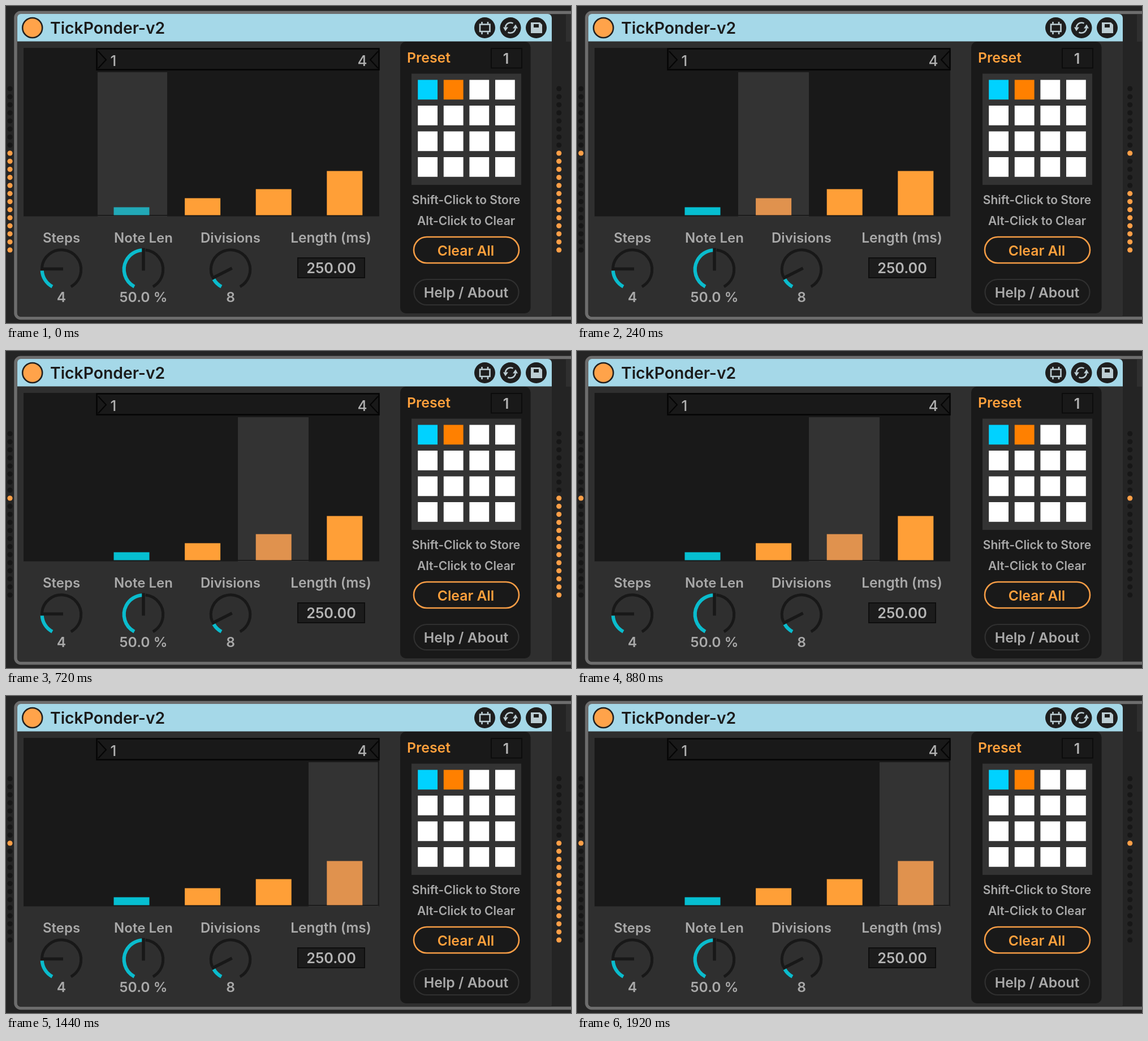
Animation, 999 px wide and 560 px high, one loop 2 s. Source, as an HTML page with a canvas:

```html
<!DOCTYPE html>
<html>
<head>
<meta charset="utf-8">
<style>
html, body { margin: 0; width: 999px; height: 560px; overflow: hidden; background: #242424; }
canvas { display: block; }
</style>
</head>
<body>
<canvas id="stage" width="999" height="560"></canvas>
<script>
const c = document.getElementById('stage').getContext('2d');
const LOOP = 2000, TICK = 80;
const STARTS = [0, 180, 680, 1430];
const CELLS = [162, 285, 410, 535, 659];
const DARK = '#191919', BODY = '#2f2f2f', GREY = '#a9a9a9', ORANGE = '#ffa03c', CYAN = '#0abccd', BLUE = '#a5d8e8';
const rad = deg => deg * Math.PI / 180;

function paint(fill, stroke, width = 2) {
  if (fill) { c.fillStyle = fill; c.fill(); }
  if (stroke) { c.strokeStyle = stroke; c.lineWidth = width; c.stroke(); }
}
function box(x, y, w, h, fill, stroke, width, radius = 0) {
  c.beginPath();
  c.roundRect(x, y, w, h, radius);
  paint(fill, stroke, width);
}
function disc(x, y, r, fill, stroke, width) {
  c.beginPath();
  c.arc(x, y, r, 0, 7);
  paint(fill, stroke, width);
}
function arc(x, y, r, from, to, color, width) {
  c.beginPath();
  c.arc(x, y, r, rad(from), rad(to));
  paint(null, color, width);
}
function path(points, stroke, width, fill) {
  c.beginPath();
  points.forEach(([x, y]) => c.lineTo(x, y));
  paint(fill, stroke, width);
}
function text(str, x, y, size, color = GREY, align = 'center', weight = 600) {
  c.font = `${weight} ${size}px Inter, sans-serif`;
  c.textAlign = align;
  c.fillStyle = color;
  c.fillText(str, x, y);
}

function drawIcons() {
  const ink = '#bccdd3';
  for (const x of [846.5, 892, 937.5]) disc(x, 38.5, 18.5, '#1e1e1e');
  box(838, 32.5, 17.5, 12.5, null, ink, 2.6);
  for (const x of [841.5, 852])
    for (const y of [28, 46]) box(x - 1.3, y, 2.6, 4, ink);
  for (const turn of [0, 180]) {
    c.save();
    c.translate(892, 38.5);
    c.rotate(rad(turn));
    arc(0, 0, 9, 185, 300, ink, 2.6);
    path([[-13, -1], [-4, -1], [-9, 6]], null, 0, ink);
    c.restore();
  }
  path([[928, 29], [944, 29], [948, 33], [948, 48], [928, 48]], null, 0, ink);
  box(933, 32, 9, 6, '#1e1e1e');
}

function drawFrame() {
  box(0, 0, 999, 560, '#252525');
  box(17, 11.5, 1010, 540, '#242424', '#6d6d6d', 5.5, 9);
  box(20, 14, 945, 535, BODY, null, 0, [6, 7, 4, 6]);
  box(20, 14, 945, 48.5, BLUE, null, 0, [6, 7, 0, 0]);
  box(990, 15, 9, 48, BODY);
  disc(46.7, 38.5, 17.5, '#ffa34a', '#202020', 2.6);
  text('TickPonder-v2', 78, 48.5, 28.3, '#1b1b1b', 'left');
  drawIcons();
}

function drawBars(step) {
  box(31, 74, 629, 297.5, DARK);
  box(160.5, 75.5, 499, 37, DARK, '#050505', 2.5);
  path([[163, 80], [177, 95], [163, 110]], '#050505', 2);
  path([[658, 80], [644, 95], [658, 110]], '#050505', 2);
  text('1', 190, 105.5, 26, '#b0b0b0', 'center', 500);
  text('4', 630, 105.5, 26, '#b0b0b0', 'center', 500);

  const left = CELLS[step], width = CELLS[step + 1] - left;
  box(left, 117, width, 255.5, '#333');
  box(left, 369, width, 1.6, '#151515');
  if (step === 3) box(657.5, 117, 1.5, 253, '#1c1c1c');
  [1, 2, 3, 5].forEach((units, i) => {
    const on = i === step;
    const color = i ? (on ? '#e0924e' : '#ff9f37') : (on ? '#22a9b7' : '#06bfd1');
    box(190.5 + i * 125.6, 371.6 - units * 16, 63, units * 16 - 2, color);
  });
}

function drawKnob(x, label, value, angle) {
  const y = 465.5, r = 34.7;
  text(label, x, 417.5, 24);
  arc(x, y, r, angle + 6, 421, '#181818', 5);
  arc(x, y, r - .4, 118, angle - 3, CYAN, 6.2);
  const dx = Math.cos(rad(angle)), dy = Math.sin(rad(angle));
  path([[x - 3 * dx, y - 1 - 3 * dy], [x + 37 * dx, y - 1 + 37 * dy]], '#181818', 5.5);
  text(value, x, 522.5, 24.6);
}

function drawControls() {
  drawKnob(98, 'Steps', '4', 180);
  drawKnob(243, 'Note Len', '50.0 %', 270);
  drawKnob(397, 'Divisions', '8', 153);
  text('Length (ms)', 574.5, 417.5, 24.5);
  box(516, 445, 118, 35, '#1c1c1c', '#0e0e0e', 2);
  text('250.00', 575, 472, 25.2, '#b4b4b4');
}

function drawPresets() {
  box(697, 63, 230.5, 480, DARK, null, 0, 10);
  text('Preset', 709, 99.5, 24.8, ORANGE, 'left');
  box(858, 75, 54, 34.5, DARK, '#0c0c0c', 2);
  text('1', 884, 102, 25, '#b4b4b4');
  box(717, 119.5, 194, 196.5, '#333');
  for (let i = 0; i < 16; i++) {
    const color = ['#00d2ff', '#ff8000'][i] || '#fff';
    box(728.2 + i % 4 * 45.6, 130.4 + (i >> 2) * 45.5, 34.8, 34.8, color);
  }
  text('Shift-Click to Store', 813.5, 350, 21);
  text('Alt-Click to Clear', 813.5, 387, 21);
  box(721, 408, 186, 46, null, '#f59c45', 2.6, 23);
  text('Clear All', 813, 440.5, 24.7, ORANGE);
  box(721.5, 483, 185, 45, null, '#303030', 2.2, 22.5);
  text('Help / About', 813.5, 514.5, 24.8);
}

const levelAt = age => Math.round(Math.min(13, 13 * Math.exp((39 - age) / 49)));

function drawMeter(x, level, peak) {
  for (let i = 0; i < 21; i++)
    disc(x, 431 - i * 14.25, 4.6, i < level || i === peak ? '#ff9f47' : '#171717');
}

function draw(now) {
  const t = Math.floor(now % LOOP / TICK) * TICK;
  const step = STARTS.filter(s => s <= t).length - 1;
  const age = t - STARTS[step];
  // The peak dot holds, then drops; the last step holds it to the end.
  const peak = step === 3 ? 12 : Math.min(12, Math.round(4 - (age - 440) / 5));
  drawFrame();
  drawBars(step);
  drawControls();
  drawPresets();
  drawMeter(7, levelAt(t), 12);
  drawMeter(977.7, levelAt(age), peak);
}

const begin = performance.now();
function loop() {
  draw(performance.now() - begin);
  requestAnimationFrame(loop);
}
loop();
</script>
</body>
</html>
```
